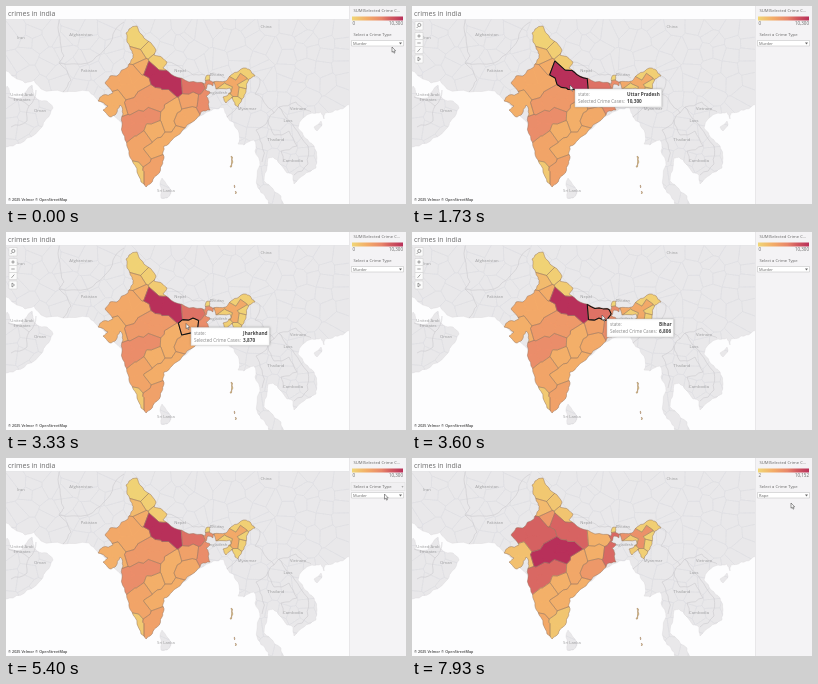
An HTML page with a canvas for the animation above (8000 ms loop, 400x198 px).

```html
<!DOCTYPE html>
<html lang="en">
<head>
<meta charset="utf-8">
<title>crimes in india</title>
<style>
html, body { margin: 0; width: 100%; height: 100%; overflow: hidden; background: #fff; }
canvas { display: block; width: 400px; height: 198px; }
</style>
</head>
<body>
<canvas id="stage"></canvas>
<script>
const LOOP = 8000;
const canvas = document.getElementById('stage');
const c = canvas.getContext('2d');
const dpr = window.devicePixelRatio || 1;
canvas.width = 400 * dpr;
canvas.height = 198 * dpr;

let seed = 7;
const rand = () => (seed = seed * 16807 % 2147483647) / 2147483647;

const points = text => {
  const n = text.split(' ').map(Number);
  return n.flatMap((x, i) => i % 2 ? [] : [{ x, y: n[i + 1] }]);
};

// Breaks each side at a randomly shifted midpoint, so a few key points give a ragged line
function rough(pts, closed, depth = 2) {
  if (!depth) return pts;
  const out = [];
  pts.forEach((a, i) => {
    out.push(a);
    if (i === pts.length - 1 && !closed) return;
    const b = pts[(i + 1) % pts.length];
    const k = (rand() - .5) * .28;
    out.push({ x: (a.x + b.x) / 2 + (b.y - a.y) * k, y: (a.y + b.y) / 2 - (b.x - a.x) * k });
  });
  return rough(out, closed, depth - 1);
}

function trace(path, pts, closed = true) {
  pts.forEach((p, i) => i ? path.lineTo(p.x, p.y) : path.moveTo(p.x, p.y));
  if (closed) path.closePath();
}
function ragged(lines, closed = true) {
  const path = new Path2D();
  lines.forEach(s => trace(path, rough(points(s), closed), closed));
  return path;
}

// Voronoi cell of s: the stage cut by every bisector; each corner keeps the neighbour along its side
function cell(s, seeds) {
  let poly = points('0 0 400 0 400 198 0 198');
  for (const o of seeds) {
    if (o === s) continue;
    const side = p => (p.x - s.x) ** 2 + (p.y - s.y) ** 2 - (p.x - o.x) ** 2 - (p.y - o.y) ** 2;
    const out = [];
    poly.forEach((a, i) => {
      const b = poly[(i + 1) % poly.length];
      const fa = side(a), fb = side(b);
      if (fa <= 0) out.push(a);
      if (fa <= 0 === fb <= 0) return;
      const k = fa / (fa - fb);
      out.push({ x: a.x + (b.x - a.x) * k, y: a.y + (b.y - a.y) * k, next: fa <= 0 ? o : a.next });
    });
    poly = out;
  }
  return poly;
}
function addEdges(path, poly, isBorder) {
  poly.forEach((a, i) => {
    if (a.next && isBorder(a.next)) trace(path, [a, poly[(i + 1) % poly.length]], false);
  });
}

const india = ragged([
  '120 27 123 23 131 20 135 28 142 35 150 44 148 49 152 50 161 56 157 62 168 70 183 76 199 78 201 69 204 69 204 75 207 76 207 80 202 78 199 84 204 86 200 90 203 96 204 104 195 106 191 112 181 119 176 125 166 134 158 140 157 146 158 152 156 159 151 169 144 178 140 181 135 176 131 166 126 154 123 145 119 134 116 120 117 108 114 99 110 108 104 111 97 104 102 100 92 95 97 89 107 87 99 77 104 70 111 70 122 61 127 52 126 45 121 36',
  '207 76 220 75 225 69 233 65 239 62 244 64 249 70 243 73 240 84 238 91 232 101 229 99 226 91 223 94 220 97 217 91 225 86 224 82 210 83',
  '225 150 226.5 151 225.5 161 224 161', '228 179 229 180 228.5 182', '229.5 185 230.5 187 229.5 188'
]);

// Each state is the union of the cells around a few inner points
const states = [];
const state = (name, murder, rape, inner, cases) => states.push({ name, murder, rape, cases, seeds: points(inner) });
state('Jammu & Kashmir', .03, .1, '128 29 135 36');
state('Himachal Pradesh', .06, .12, '142 43');
state('Punjab', .2, .2, '131 50');
state('Haryana', .3, .45, '136 61');
state('Uttarakhand', .08, .13, '152 55');
state('Rajasthan', .33, .73, '107 76 119 71 128 68 121 86 137 77');
state('Gujarat', .28, .16, '99 93 112 93 103 105 115 103');
state('Maharashtra', .53, .7, '120 117 121 128 132 113 131 122 146 109');
state('Karnataka', .36, .27, '129 138 138 132 131 150 138 153');
state('Kerala', .09, .33, '129 161 134 172');
state('Tamil Nadu', .38, .12, '142 172 145 163 151 157');
state('Telangana', .28, .27, '145 127 152 124');
state('Andhra Pradesh', .29, .28, '147 146 155 139 163 132 172 126');
state('Odisha', .32, .45, '175 115 184 108');
state('Chhattisgarh', .28, .34, '167 99 163 110 163 120', '2,860');
state('Madhya Pradesh', .44, 1, '125 100 136 96 142 86 150 98 149 90 162 91', '4,548');
state('Uttar Pradesh', 1, .72, '144 64 151 73 162 76 170 82', '10,300');
state('Jharkhand', .38, .28, '181 95 188 93', '3,870');
state('Bihar', .66, .27, '182 81 193 82', '6,806');
state('West Bengal', .53, .7, '199 100 196 94 201 88 203 77', '5,420');
state('Sikkim', .01, .02, '202 71');
state('Assam', .32, .5, '213 78 225 76 235 73 229 85');
state('Arunachal Pradesh', .05, .06, '229 69 240 66 246 69');
state('Meghalaya', .06, .08, '216 82 222 83');
state('Nagaland', .03, .02, '238 78');
state('Manipur', .04, .03, '236 86');
state('Mizoram', .02, .05, '229 96');
state('Tripura', .05, .08, '221 92');
state('Andaman and Nicobar', .02, .04, '226 158 229 183');

const stateSeeds = states.flatMap(s => s.seeds);
for (const s of states) {
  s.area = new Path2D();
  s.border = new Path2D();
  for (const p of s.seeds) {
    const poly = cell(p, stateSeeds);
    trace(s.area, poly);
    addEdges(s.border, poly, o => !s.seeds.includes(o));
  }
}

const land = ragged([
  '-10 55 0 65 8 71 19 77 28 74 35 83 57 86 83 85 92 94 105 108 118 120 125 145 140 178 154 155 157 142 176 125 191 112 204 105 211 103 218 102 221 111 228 117 233 127 232 138 238 139 248 134 249 145 254 159 252 182 259 190 264 200 280 200 275 190 264 180 258 175 261 161 262 152 267 151 274 158 281 167 287 169 288 178 298 169 310 162 311 152 308 140 299 132 292 122 297 112 306 107 315 106 318 113 319 107 329 104 339 101 350 98 350 0 -10 0',
  '-5 86 1 80 3 91 16 92 26 79 27 86 31 93 41 95 47 102 40 113 36 121 21 132 7 140 -5 143',
  '154 179 156 172 161 179 165 187 161 192 155 192',
  '308 121 315 115 316 119 311 125'
]);
const borders = ragged([
  '54 12 54 31 58 50 53 57 65 74 57 86', '53 57 82 57 98 44 107 28 118 16',
  '161 56 176 63 187 69 199 69', '204 68 208 67 219 72',
  '247 67 254 73 249 88 261 100 268 107 273 101 290 96 298 104 305 106',
  '236 90 230 103 221 111', '268 107 262 114 250 124 256 138 256 156',
  '262 114 268 129 283 125 291 140 275 145 277 156',
  '273 101 280 112 288 121 302 140 302 158 288 169', '2 91 23 100 30 84', '23 100 21 115 5 121'
], false);

// Provinces: cells of a jittered grid
const STEP = 15;
const grid = [];
for (let y = 13; y < 198; y += STEP)
  for (let x = 0; x < 345; x += STEP) grid.push({ x: x + rand() * STEP, y: y + rand() * STEP });
const provinces = new Path2D();
grid.forEach(p => addEdges(provinces, cell(p, grid), () => true));

const labels = [
  ['Iran', 15, 33], ['Afghanistan', 75, 30], ['Pakistan', 83, 66], ['China', 260, 22],
  ['Nepal', 174, 66], ['Bhutan', 211, 70], ['Bangladesh', 210, 88], ['Myanmar', 241, 104],
  ['Thailand', 270, 135], ['Cambodia', 287, 156], ['Laos', 282, 116], ['Vietnam', 292, 104],
  ['United Arab', 16, 90], ['Emirates', 16, 95], ['Oman', 34, 106], ['Sri Lanka', 160, 186]
];

const ramp = [[0, 240, 214, 118], [.3, 243, 172, 104], [.58, 232, 134, 106], [.75, 211, 92, 96], [1, 184, 48, 90]];
function heat(v) {
  const i = Math.max(1, ramp.findIndex(r => r[0] >= v));
  const [a, b] = [ramp[i - 1], ramp[i]];
  const k = (v - a[0]) / (b[0] - a[0]);
  return `rgb(${[1, 2, 3].map(j => Math.round(a[j] + (b[j] - a[j]) * k))})`;
}

const FONT = '"Open Sans", "Noto Sans", sans-serif';
function text(s, x, y, size = 4.3, color = '#666', align = 'left', weight = 400) {
  c.font = `${weight} ${size}px ${FONT}`;
  c.fillStyle = color;
  c.textAlign = align;
  c.fillText(s, x, y);
}
function box(x, y, w, h, fill, edge) {
  c.fillStyle = fill;
  c.fillRect(x, y, w, h);
  if (!edge) return;
  c.strokeStyle = edge;
  c.lineWidth = .5;
  c.strokeRect(x, y, w, h);
}
function stroke(path, color, width) {
  c.strokeStyle = color;
  c.lineWidth = width;
  c.stroke(path);
}
function clipped(path, paint) {
  c.save();
  c.clip(path);
  paint();
  c.restore();
}

function drawMap(key, hovered) {
  box(0, 0, 400, 198, '#fdfdfe');
  c.lineJoin = 'round';
  clipped(land, () => {
    box(0, 0, 400, 198, '#e9e8ea');
    stroke(provinces, '#dddce0', .5);
  });
  stroke(land, '#d8d7da', .4);
  stroke(borders, '#cbcacd', .6);
  labels.forEach(([s, x, y]) => text(s, x, y, 4.2, '#9c9c9e', 'center'));

  clipped(india, () => {
    for (const s of states) {
      c.fillStyle = heat(s[key]);
      c.fill(s.area);
      stroke(s.area, c.fillStyle, .5);
    }
    states.forEach(s => stroke(s.border, '#967660', .4));
  });
  stroke(india, '#967660', .5);
  if (hovered) clipped(india, () => {
    stroke(hovered.border, '#111', 1.1);
    clipped(hovered.area, () => stroke(india, '#111', 2));
  });
  text('© 2025 Velmor © OpenStreetMap', 2, 195, 3.7, '#444', 'left', 600);
}

function drawToolbar() {
  [[15.5, 8.5], [26.5, 7], [33.5, 7], [40.5, 7], [49, 8]].forEach(([y, h]) => box(3, y, 8, h, '#fbfbfb', '#ccc'));
  const icons = new Path2D('M8.9 19a1.6 1.6 0 1 0-3.2 0a1.6 1.6 0 1 0 3.2 0M6 20.5L4.7 22M5.3 30h3.4M7 28.3v3.4M5.3 37h3.4M5.5 45.8L8.3 42.6M6 51l2.5 2L6 55z');
  stroke(icons, '#777', .7);
}

function drawPanel(key, active, listOpen) {
  box(0, 0, 343, 13, '#fdfdfe');
  box(343, 0, 57, 198, '#f4f3f5');
  box(0, 13, 343, .5, '#e2e2e4');
  box(343, 0, .5, 198, '#dcdbdd');
  text('crimes in india', 2, 9.8, 7, '#6a6a6a');

  text('SUM(Selected Crime C...', 347.5, 6.3, 4.2);
  const g = c.createLinearGradient(346, 0, 397, 0);
  ramp.forEach(r => g.addColorStop(r[0], heat(r[0])));
  box(346, 10.5, 51, 4, g);
  const [low, high] = key === 'murder' ? ['0', '10,300'] : ['2', '10,152'];
  text(low, 346.5, 19, 4.5);
  text(high, 397, 19, 4.5, '#666', 'right');

  if (active) {
    box(345, 24.5, 54, 8, '#f1f0f2', '#dcdcdc');
    text('▾', 396.5, 30, 4, '#aaa', 'center');
  }
  text('Select a Crime Type', 347.5, 30, 4.2);
  box(345.5, 34.5, 52, 5.5, '#fff', '#bbb');
  text(key === 'murder' ? 'Murder' : 'Rape', 347, 38.8, 4);
  c.fillStyle = '#666';
  c.fill(new Path2D('M393 36.5h3l-1.5 2z'));
  if (!listOpen) return;
  box(345.5, 40.5, 52, 64, '#fff', '#ccc');
  ['Murder', 'Rape', 'Kidnapping', 'Robbery', 'Burglary', 'Theft', 'Riots', 'Arson', 'Cheating']
    .forEach((s, i) => text(s, 348, 45.7 + i * 7, 4));
}

function drawTooltip(s, x, y) {
  c.font = `700 4.7px ${FONT}`;
  const w = 54 + c.measureText(s.name).width;
  c.save();
  c.shadowColor = 'rgba(0,0,0,.2)';
  c.shadowBlur = 2 * dpr;
  box(x, y, w, 18, '#fff', '#d4d4d4');
  c.restore();
  [['state:', s.name], ['Selected Crime Cases:', s.cases]].forEach(([a, b], i) => {
    text(a, x + 3, y + 7.2 + i * 7, 4.6, '#888');
    text(b, x + 52, y + 7.2 + i * 7, 4.7, '#444', 'left', 700);
  });
}

const arrow = new Path2D('M0 0v5.2l1.2-1l.9 2l.8-.4l-.8-1.9h1.6z');
function drawCursor(x, y) {
  c.save();
  c.translate(x, y);
  c.fillStyle = '#fff';
  c.fill(arrow);
  stroke(arrow, '#444', .55);
  c.restore();
}

// [start, end, x, y]: the pointer travels to x,y between the two times
const moves = [
  [0, 0, 386, 41], [1730, 1730, 158, 79], [2730, 2730, 155, 93],
  [2800, 3130, 170, 100], [3130, 3530, 190, 83], [3600, 3730, 199, 87],
  [4000, 4400, 288, 60], [4670, 4670, 359, 58], [5000, 5400, 378.5, 36],
  [6470, 6600, 375, 49], [7800, 7930, 379, 45]
];
function pointer(t) {
  let x = 0, y = 0;
  for (const [a, b, tx, ty] of moves) {
    if (t < a) break;
    const k = t >= b ? 1 : (t - a) / (b - a);
    const e = k * k * (3 - 2 * k);
    x += (tx - x) * e;
    y += (ty - y) * e;
  }
  return [x, y];
}

function draw(t) {
  const key = t < 7330 ? 'murder' : 'rape';
  const [x, y] = pointer(t);
  c.setTransform(dpr, 0, 0, dpr, 0, 0);
  const under = path => c.isPointInPath(path, x * dpr, y * dpr);
  const hovered = under(india) && states.find(s => under(s.area));
  drawMap(key, hovered);
  drawPanel(key, t >= 5130 && t < 7330, t >= 6470 && t < 6600);
  if (t >= 1730 && t < 4670) drawToolbar();
  if (hovered && hovered.cases) drawTooltip(hovered, x + 5, y + 4);
  drawCursor(x, y);
}

const start = performance.now();
function frame() {
  draw((performance.now() - start) % LOOP);
  requestAnimationFrame(frame);
}
frame();
</script>
</body>
</html>
```
